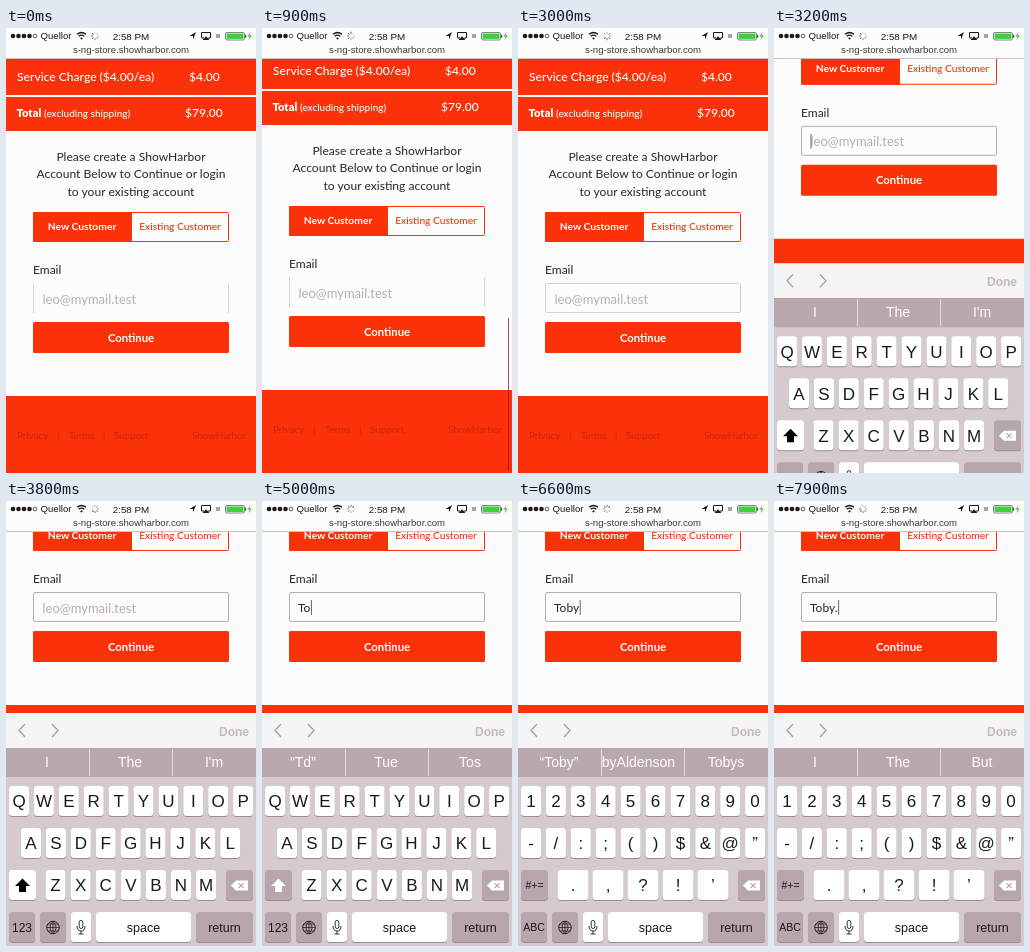
Recreate the animation shown at these times as an HTML page. Size 250 px wide and 445 px high, loop 8000 ms.

```html
<!DOCTYPE html>
<html lang="en">
<head>
<meta charset="utf-8">
<title>Checkout sign-up</title>
<style>
html, body { margin: 0; width: 100%; height: 100%; overflow: hidden; background: #fcfcfc; }
svg { display: block; width: 100vw; height: 100vh; }
.brand { font-family: Lato, "Open Sans", sans-serif; }
.sys { font-family: "Liberation Sans", Arial, sans-serif; }
text { white-space: pre; }
</style>
</head>
<body>
<svg id="stage" viewBox="0 0 250 445">
  <defs><clipPath id="midCell"><rect x="84" y="247" width="82" height="29"/></clipPath></defs>
  <g id="page"></g>
  <rect id="scrollbar" x="246" y="290" width="1" height="153" fill="#7a1a20" opacity=".75"/>
  <g id="bar"></g>
  <g id="keyboard"></g>
</svg>
<script>
const RED = '#fa3109', PAPER = '#fcfcfc', KEY_GREY = '#b7a6ac', INK = '#1c181a';
const byId = id => document.getElementById(id);

function add(parent, tag, attrs) {
  const el = document.createElementNS('http://www.w3.org/2000/svg', tag);
  for (const k in attrs) el.setAttribute(k, attrs[k]);
  return parent.appendChild(el);
}
const rect = (p, x, y, width, height, fill, more) =>
  add(p, 'rect', { x, y, width, height, fill, ...more });
const path = (p, d, more) =>
  add(p, 'path', { d, fill: 'none', stroke: INK, 'stroke-width': 1, ...more });
// y is the middle of the capitals
function label(p, str, x, y, size, fill, more) {
  const el = add(p, 'text', { x, y: y + size * .35, 'font-size': size, fill, ...more });
  el.textContent = str;
  return el;
}
const MID = { 'text-anchor': 'middle' };
const MEDIUM = { 'font-weight': 500 };
const BOLD = { 'font-weight': 700 };

// ---- Page ----
const page = byId('page');
page.setAttribute('class', 'brand');
rect(page, 0, 0, 250, 67, RED);
rect(page, 0, 69, 250, 34, RED);
label(page, 'Service Charge ($4.00/ea)', 11, 49, 12.1, '#fff', MEDIUM);
label(page, '$4.00', 183, 49, 12, '#fff', MEDIUM);
label(page, 'Total', 10.5, 85.5, 11.2, '#fff', { 'font-weight': 900 });
label(page, '(excluding shipping)', 38, 85.5, 10, '#fff', MEDIUM);
label(page, '$79.00', 179, 85, 12, '#fff', MEDIUM);

['Please create a ShowHarbor', 'Account Below to Continue or login', 'to your existing account']
  .forEach((line, i) => label(page, line, 125, 128.7 + i * 17.3, 12.1, '#2a2627', MID));

rect(page, 27.5, 184.5, 195, 29, PAPER, { stroke: RED, 'stroke-width': 1, rx: 1 });
rect(page, 27, 184, 99, 30, RED, { rx: 1 });
label(page, 'New Customer', 76, 198, 10.3, '#fff', { ...MID, ...BOLD });
label(page, 'Existing Customer', 174, 198, 10.2, RED, { ...MID, ...MEDIUM });

label(page, 'Email', 27, 242, 12, '#2a2627');
const fieldSides = path(page, 'M27.5 255V285M222.5 255V285', { stroke: '#ddd3d7' });
const fieldBox = rect(page, 27.5, 255.5, 195, 29, 'none', { rx: 1.5 });
const hint = label(page, 'leo@mymail.test', 36.5, 271, 13, '#b9adb2');
const typed = label(page, '', 36, 271, 12, '#2a2627');
const caret = rect(page, 37, 263, 1, 15, '#6a6290');

rect(page, 27, 294, 196, 31, RED, { rx: 1.5 });
label(page, 'Continue', 125, 309.6, 11.3, '#fff', { ...MID, ...BOLD });

rect(page, 0, 368, 250, 300, RED);
[['Privacy', 11], ['|', 51], ['Terms', 63], ['|', 97], ['Support', 108], ['ShowHarbor', 186]]
  .forEach(([s, x]) => label(page, s, x, 408, 9.8, '#c92a0c'));

// ---- Status and address bar ----
const bar = byId('bar');
bar.setAttribute('class', 'sys');
rect(bar, 0, 0, 250, 30, PAPER);
rect(bar, 0, 30, 250, 1, '#cfc0c2');
for (let i = 0; i < 5; i++)
  add(bar, 'circle', { cx: 7 + i * 5.5, cy: 8, r: i < 4 ? 2.3 : 1.9, fill: i < 4 ? INK : '#fff', stroke: INK, 'stroke-width': i < 4 ? 0 : .7 });
label(bar, 'Quellor', 34.5, 8, 9.6, INK);
path(bar, 'M71 6.3Q75.5 2.8 80 6.3M72.7 8.3Q75.5 6 78.3 8.3', { 'stroke-width': 1.4 });
path(bar, 'M74 10Q75.5 8.8 77 10L75.5 11.8Z', { fill: INK, stroke: 'none' });
const spinner = add(bar, 'g', {});
for (let i = 0; i < 8; i++)
  path(spinner, 'M0 -2V-4.2', { transform: `rotate(${i * 45})`, stroke: '#55505a', opacity: .2 + i * .1 });
label(bar, '2:58 PM', 125, 8.5, 9.8, INK, { ...MID, ...MEDIUM });
path(bar, 'M190 4L183.5 8H187V11.5Z', { fill: INK, stroke: 'none' });
path(bar, 'M198 10H195.5V4.5H204.5V10H202');
path(bar, 'M196.5 12L200 8.2L203.5 12Z', { fill: INK, stroke: 'none' });
rect(bar, 210, 6, 4, 4, '#aaa2a8');
rect(bar, 219.5, 4.5, 19, 7.5, '#fff', { rx: 1.5, stroke: '#555', 'stroke-width': .7 });
rect(bar, 220.5, 5.5, 17, 5.5, '#3fd23f', { rx: .6 });
rect(bar, 239, 6.7, 1.2, 3, '#555');
path(bar, 'M244.5 4L241.5 8.6H243.6L242.6 12L245.8 7.4H243.6Z', { fill: '#35c935', stroke: 'none' });
label(bar, 's-ng-store.showharbor.com', 125, 21.5, 9.6, '#3d383a', MID);

// ---- Keyboard ----
const keyboard = byId('keyboard');
keyboard.setAttribute('class', 'sys');
rect(keyboard, 0, 212, 250, 35, '#f6f3f4');
path(keyboard, 'M19 223L13 229.5L19 236M46 223L52 229.5L46 236', { stroke: '#aaa0a5', 'stroke-width': 1.3 });
label(keyboard, 'Done', 243, 230.5, 12, '#c4bbc0', { 'text-anchor': 'end', ...BOLD });
rect(keyboard, 0, 247, 250, 29.5, '#b9a8af');
rect(keyboard, 83, 248, 1, 27, '#e4dade');
rect(keyboard, 166, 248, 1, 27, '#e4dade');
const words = [41, 124, 208].map((x, i) => {
  const cell = add(keyboard, 'g', i === 1 ? { 'clip-path': 'url(#midCell)' } : {});
  return label(cell, '', x, 261, 14, '#fff', MID);
});
rect(keyboard, 0, 276, 250, 169, '#d5cacf');

function key(p, cx, y, w, str, size = 17, fill = '#fff') {
  rect(p, cx - w / 2, y + 1, w, 30, '#988b91', { rx: 3.5 });
  const face = rect(p, cx - w / 2, y, w, 30, fill, { rx: 3.5 });
  if (str) label(p, str, cx, y + 15.5, size, INK, MID);
  return face;
}
const row = (p, chars, x, step, y, w) =>
  [...chars].forEach((c, i) => key(p, x + i * step, y, w, c));

const letters = add(keyboard, 'g', {});
row(letters, 'QWERTYUIOP', 13, 24.9, 285, 20);
row(letters, 'ASDFGHJKL', 25, 24.9, 327, 20);
row(letters, 'ZXCVBNM', 49.5, 25.1, 369, 20);
const shiftKey = key(letters, 16.5, 369, 27, '');
const shiftArrow = path(letters, 'M16.5 377.5L9 385H13V391H20V385H24Z', { stroke: 'none' });
key(letters, 16, 411, 26, '123', 12, KEY_GREY);

const digits = add(keyboard, 'g', {});
row(digits, '1234567890', 13, 24.9, 285, 20);
row(digits, '-/:;()$&@”', 13, 24.9, 327, 20);
row(digits, '.,?!’', 55, 35, 369, 31);
key(digits, 16.5, 369, 27, '#+=', 10.5, KEY_GREY);
key(digits, 16, 411, 26, 'ABC', 10.5, KEY_GREY);

key(keyboard, 233.5, 369, 27, '', 0, KEY_GREY);
path(keyboard, 'M225 384.5L230 379.5H242V389.5H230Z', { fill: '#fff', stroke: 'none' });
path(keyboard, 'M232.5 382L237.5 387M237.5 382L232.5 387', { stroke: '#8f7f86' });
key(keyboard, 47, 411, 26, '', 0, KEY_GREY);
add(keyboard, 'circle', { cx: 47, cy: 426.5, r: 6.3, fill: 'none', stroke: INK, 'stroke-width': .9 });
path(keyboard, 'M47 420V433M40.7 426.5H53.3M42 423H52M42 430H52M47 420Q41 426.5 47 433Q53 426.5 47 420', { 'stroke-width': .7 });
key(keyboard, 75, 411, 20, '');
rect(keyboard, 73.2, 419.5, 3.6, 8, 'none', { rx: 1.8, stroke: INK, 'stroke-width': .9 });
path(keyboard, 'M71 425Q71 430 75 430Q79 430 79 425M75 430V433M72.5 433H77.5', { 'stroke-width': .9 });
key(keyboard, 137.5, 411, 95, 'space', 12.5);
key(keyboard, 218.5, 411, 57, 'return', 12.5, KEY_GREY);

// ---- Timeline ----
const LOOP = 8000, TICK = 100, FOCUS = 3000;
const steps = [
  { at: FOCUS, text: '', words: ['I', 'The', 'I\'m'] },
  { at: 4200, text: 'T', words: ['“T”', 'The', 'To'] },
  { at: 4800, text: 'To', words: ['“Td”', 'Tue', 'Tos'] },
  { at: 5300, text: 'Tob', words: ['“Tob”', 'Toby', 'Tobs'] },
  { at: 5600, text: 'Toby', words: ['“Toby”', 'TobyAldenson', 'Tobys'] },
  { at: 7400, text: 'Toby.', words: ['I', 'The', 'But'] }
];
const DIGITS_AT = 6100;
const clamp = v => Math.min(1, Math.max(0, v));
const easeOut = (t, power) => 1 - Math.pow(1 - clamp((t - FOCUS) / 300), power);
const smooth = v => v * v * (3 - 2 * v);
const show = (el, on) => el.setAttribute('visibility', on ? 'visible' : 'hidden');

function draw(t) {
  const pull = 6 * (smooth(clamp((t - 500) / 400)) - smooth(clamp((t - 1000) / 400)));
  page.setAttribute('transform', `translate(0 ${-(pull + 164 * easeOut(t, 2.9))})`);
  show(byId('scrollbar'), t >= 600 && t < 1700);
  keyboard.setAttribute('transform', `translate(0 ${233 * (1 - easeOut(t, 2.1))})`);
  spinner.setAttribute('transform', `translate(89 8) rotate(${t / TICK * 45})`);

  const step = steps.filter(s => s.at <= t).pop() || steps[0];
  typed.textContent = step.text;
  step.words.forEach((w, i) => { words[i].textContent = w; });
  const long = step.words[1].length > 8;
  words[1].setAttribute('text-anchor', long ? 'end' : 'middle');
  words[1].setAttribute('x', long ? 157 : 124);

  const ready = t >= 1900;
  show(fieldSides, !ready);
  show(fieldBox, ready);
  fieldBox.setAttribute('stroke', t > FOCUS ? '#b8abb2' : '#e0cdd0');
  show(hint, !step.text);
  show(caret, t > FOCUS && (t - step.at) % 1000 < 600);
  caret.setAttribute('x', 36.5 + (step.text ? typed.getComputedTextLength() : 0));

  const caps = !step.text;
  shiftKey.setAttribute('fill', caps ? '#fff' : KEY_GREY);
  shiftArrow.setAttribute('fill', caps ? '#000' : '#fff');
  show(letters, t < DIGITS_AT);
  show(digits, t >= DIGITS_AT);
}

const start = performance.now();
function frame() {
  const t = (performance.now() - start) % LOOP;
  draw(Math.floor(t / TICK) * TICK);
  requestAnimationFrame(frame);
}
frame();
</script>
</body>
</html>
```
